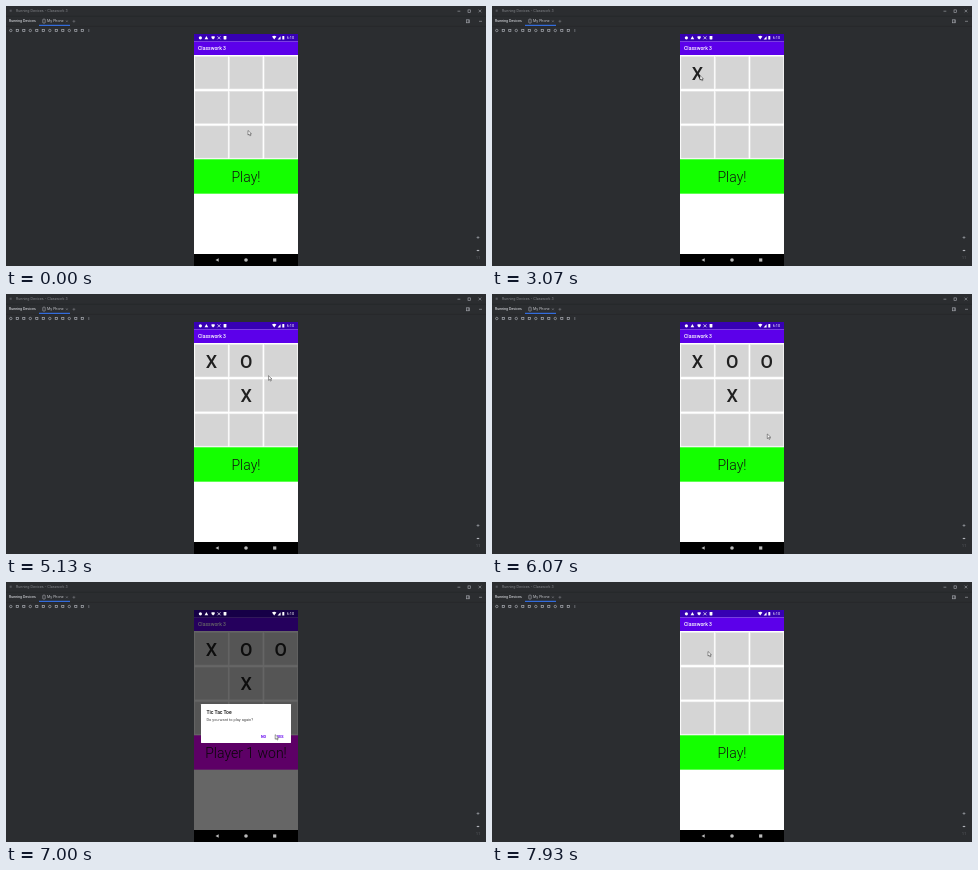
An HTML page for the animation above (8 s loop, 480 px wide and 260 px high).

```html
<!DOCTYPE html>
<html lang="en">
<head>
<meta charset="utf-8">
<title>Tic Tac Toe</title>
<style>
  html, body { margin: 0; width: 100%; height: 100%; overflow: hidden; background: #2b2d30; }
  svg { display: block; width: 100%; height: 100%; }
  text { font-family: Roboto, sans-serif; }
  .ide text { font-family: Inter, sans-serif; font-size: 3.5px; }
  .mid { text-anchor: middle; }
  .mark { font-size: 18px; font-weight: 500; fill: #202020; }
</style>
</head>
<body>
<svg viewBox="0 0 480 260">
  <rect width="480" height="260" fill="#2b2d30"/>
  <g class="ide" fill="#c8cacf">
    <path d="M0 10.2H480M0 20.3H480" stroke="#232428" stroke-width=".6"/>
    <text x="10" y="6.3" fill="#85878c">Running Devices - Classwork 3</text>
    <path d="M3.7 4.2h2M3.7 5.2h2" stroke="#85878c" stroke-width=".5"/>
    <text x="3" y="16.4" font-weight="600" style="font-size:3.3px">Running Devices</text>
    <rect x="36.8" y="13.2" width="2.4" height="3.8" rx=".4" fill="none" stroke="#a8abb2" stroke-width=".6"/>
    <text x="41" y="16.4">My Phone</text>
    <rect x="33" y="18.8" width="31" height="1.1" fill="#3574f0"/>
    <path d="M60 14.4l1.8 1.8m0-1.8l-1.8 1.8M66.5 15.3h2.8m-1.4-1.4v2.8" stroke="#85878c" stroke-width=".5"/>
    <g id="tools" fill="none" stroke="#a8abb2" stroke-width=".7"></g>
    <g fill="none" stroke="#a8abb2" stroke-width=".6">
      <path d="M451.5 5.2h2.8M472.6 3.7l2.6 2.6m0-2.6l-2.6 2.6M473 15.3h3M470.6 231.5h2.8m-1.4-1.4v2.8M470.6 244.5h2.8"/>
      <rect x="462" y="3.9" width="2.4" height="2.4"/>
      <rect x="460.3" y="13.8" width="3" height="3"/>
      <path d="M462.3 13.8v3"/>
    </g>
    <circle cx="472" cy="244.5" r=".8"/>
    <text x="472" y="253" class="mid" fill="#65676c" style="font-size:3px">1:1</text>
  </g>

  <rect x="188" y="28" width="104" height="232" fill="#fff"/>
  <rect x="188" y="28" width="104" height="7.5" fill="#3700b3"/>
  <rect x="188" y="35.5" width="104" height="13.5" fill="#5c00ea"/>
  <text x="192" y="44" font-size="5.1" font-weight="500" fill="#fff">Classwork 3</text>
  <g id="cells"></g>
  <rect id="btn" x="188" y="153" width="104" height="35"/>
  <path d="M188 153.3H292M188 187.6H292" stroke="#fff" stroke-opacity=".45" stroke-width=".8"/>
  <text id="label" class="mid" x="240" y="175.7" font-size="14" font-weight="300" fill="#111"></text>
  <rect id="scrim" x="188" y="28" width="104" height="220"/>

  <g fill="#fff">
    <circle cx="194.4" cy="31.8" r="1.6"/>
    <path d="M198.6 33.3l1.8-3.2 1.8 3.2z"/>
    <path d="M205.5 30.2h3.2v1.8l-1.6 1.6-1.6-1.6z"/>
    <path d="M211.5 30.3l3 3m0-3l-3 3" stroke="#fff" stroke-width=".7"/>
    <rect x="217.6" y="30.1" width="2.8" height="3.4" rx=".4"/>
    <path d="M266 30.6q2.2-1.6 4.4 0l-2.2 2.8zM271.6 33.4h3v-3.2z"/>
    <rect x="276.3" y="30" width="2" height="3.5" rx=".3"/>
    <text x="280.8" y="33.3" font-size="3.8">6:10</text>
  </g>
  <rect x="188" y="248" width="104" height="12"/>
  <g fill="#bbb">
    <path d="M212.7 252.2v3.6l-3.2-1.8z"/>
    <circle cx="240" cy="254" r="1.8"/>
    <rect x="267.1" y="252.4" width="3.2" height="3.2"/>
  </g>

  <g id="dialog">
    <rect x="195" y="122" width="90" height="39" rx=".4" fill="#fff"/>
    <text x="200.5" y="131.5" font-size="5" font-weight="500" fill="#111">Tic Tac Toe</text>
    <text x="200.5" y="139.3" font-size="3.95" fill="#444">Do you want to play again?</text>
    <g class="mid" font-size="3.7" font-weight="700" fill="#6200ee">
      <text x="257.5" y="155.6">NO</text>
      <text x="274.3" y="155.6">YES</text>
    </g>
  </g>
  <path id="cursor" d="M0 0v4.6l1.1-1 .8 1.8.9-.4-.8-1.7h1.5z" fill="#fff" stroke="#222" stroke-width=".45"/>
</svg>
<script>
const LOOP = 8000, RESET = 7470, WIN = 6330;
const $ = id => document.getElementById(id);
const clamp = v => Math.max(0, Math.min(1, v));
const ramp = (t, from, to) => clamp((t - from) / (to - from));
const ease = p => p * p * (3 - 2 * p);

function add(parent, tag, attrs, text = '') {
  const el = document.createElementNS('http://www.w3.org/2000/svg', tag);
  for (const k in attrs) el.setAttribute(k, attrs[k]);
  el.textContent = text;
  return parent.appendChild(el);
}

// toolbar icons alternate between rings and squares
for (let i = 0; i < 13; i++) {
  const x = 4.8 + i * 6.5;
  if (i === 12) add($('tools'), 'path', { d: `M${x} 23v3`, 'stroke-dasharray': '.7 .4' });
  else if (i % 3) add($('tools'), 'rect', { x: x - 1.1, y: 23.4, width: 2.2, height: 2.2 });
  else add($('tools'), 'circle', { cx: x, cy: 24.5, r: 1.2 });
}

const colX = c => 189 + c * 34.6;
const rowY = r => 50.7 + r * 34.6;
for (let i = 0; i < 9; i++)
  add($('cells'), 'rect', {
    x: colX(i % 3), y: rowY(i / 3 | 0), width: 33, height: 32.2,
    fill: '#d5d5d5', stroke: '#e6e6e6', 'stroke-width': .5
  });

const moves = [
  { at: 3070, cell: 0, mark: 'X' },
  { at: 3930, cell: 1, mark: 'O' },
  { at: 4870, cell: 4, mark: 'X' },
  { at: 5470, cell: 2, mark: 'O' },
  { at: WIN, cell: 8, mark: 'X' }
];
for (const m of moves)
  m.el = add($('cells'), 'text', {
    class: 'mark mid', x: colX(m.cell % 3) + 16.5, y: rowY(m.cell / 3 | 0) + 22.8
  }, m.mark);

// start, end, then the point the pointer reaches
const path = [
  [0, 0, 242, 124.5],
  [1470, 2130, 208, 69.5],
  [3130, 3870, 246, 72],
  [3930, 4300, 243.5, 91.5],
  [4400, 4730, 242, 95],
  [4900, 5270, 272, 75.5],
  [5500, 6070, 275.3, 140],
  [6540, 7050, 269, 153],
  [7480, 7930, 216, 69.5]
];

function pointer(t) {
  let [, , x, y] = path[0];
  for (const [from, to, px, py] of path.slice(1)) {
    const p = ease(ramp(t, from, to));
    x += (px - x) * p;
    y += (py - y) * p;
  }
  return [x, y];
}

function draw(t) {
  for (const m of moves)
    m.el.setAttribute('visibility', t >= m.at && t < RESET ? 'visible' : 'hidden');
  const won = t >= WIN && t < RESET;
  $('btn').setAttribute('fill', won ? '#ea00ff' : '#14ff00');
  $('label').textContent = won ? 'Player 1 won!' : 'Play!';
  const out = 1 - ramp(t, RESET, 7620);
  $('scrim').setAttribute('opacity', .6 * ramp(t, 6400, 6590) * out);
  $('dialog').setAttribute('opacity', ramp(t, 6400, 6493) * out);
  $('cursor').setAttribute('transform', `translate(${pointer(t)})`);
}

const start = performance.now();
function tick() {
  draw((performance.now() - start) % LOOP);
  requestAnimationFrame(tick);
}
tick();
</script>
</body>
</html>
```
